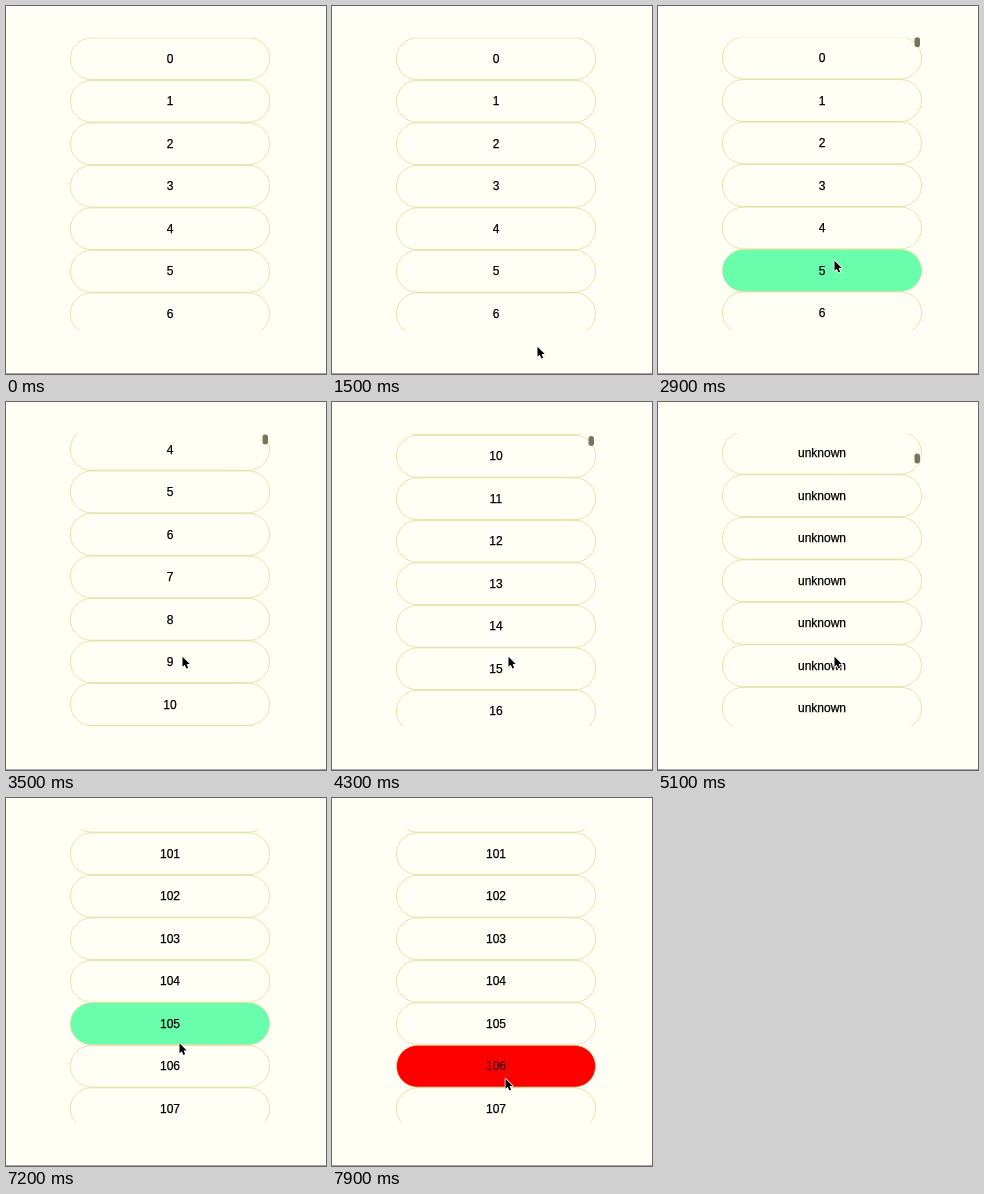
These frames come from a looping animation (320 px wide and 368 px high, 8000 ms). An HTML page with a canvas:

```html
<!DOCTYPE html>
<html lang="en">
<head>
<meta charset="utf-8">
<title>Virtual list</title>
<style>
  html, body { margin: 0; width: 100%; height: 100%; overflow: hidden; background: #fffff5; }
  canvas { display: block; width: 320px; height: 368px; }
</style>
</head>
<body>
<canvas id="stage"></canvas>
<script>
const LOOP = 8000, STEP = 100;
const LIST = { x: 64, y: 31.5, width: 200, height: 293 };
const ROW = 42.5, ROW_COUNT = 1000;
const COLORS = {
  page: '#fffff5', border: '#dede98', hover: '#69feab', pressed: '#ff0000',
  thumb: '#77735c', text: '#000000', pressedText: '#500000', edge: '#a6a6a6'
};
const POINTER_SHAPE = new Path2D('M0 0V10L2.3 7.9L3.9 11.6L5.6 10.9L4.1 7.2H7.2Z');

const canvas = document.getElementById('stage');
const ctx = canvas.getContext('2d');
const ratio = window.devicePixelRatio || 1;
canvas.width = 320 * ratio;
canvas.height = 368 * ratio;

const smooth = u => u * u * (3 - 2 * u);
const decelerate = u => 1 - (1 - u) ** 1.6055;

// Eased progress from 0 to 1 between two times
function glide(time, from, to, ease = smooth) {
  return ease(Math.min(1, Math.max(0, (time - from) / (to - from))));
}

function scrollAt(time) {
  return 423.5 * glide(time, 2865, 4300) + 3866 * glide(time, 4700, 5500, decelerate);
}

function pointerAt(time) {
  if (time < 1500) return null;
  const enter = glide(time, 1500, 2100);
  const down = glide(time, 2300, 2600);
  const up = glide(time, 5700, 6500);
  const press = glide(time, 6600, 7500);
  return {
    x: 205 - 42 * enter + 13 * down - 3 * up,
    y: 340 - 198 * enter + 112 * down - 111 * up + 137 * press
  };
}

function drawRow(top, label, fill, textColor) {
  ctx.beginPath();
  ctx.roundRect(LIST.x + 0.4, top + 0.3, LIST.width - 0.8, ROW - 0.6, ROW / 2);
  if (fill) {
    ctx.fillStyle = fill;
    ctx.fill();
  }
  ctx.strokeStyle = COLORS.border;
  ctx.lineWidth = 0.8;
  ctx.stroke();

  const x = LIST.x + LIST.width / 2, y = top + ROW / 2 + 4.2;
  ctx.fillStyle = ctx.strokeStyle = textColor;
  ctx.lineWidth = 0.25;
  ctx.fillText(label, x, y);
  ctx.strokeText(label, x, y);
}

function drawList(time, scroll, pointer) {
  const scrolling = time > 2900 && time < 5600;
  const loading = time >= 4700 && time < 5600;
  const pressed = time >= 7500;
  const hovered = pointer && !scrolling
    ? Math.floor((pointer.y - LIST.y + scroll) / ROW) : -1;

  ctx.save();
  ctx.beginPath();
  ctx.rect(LIST.x - 1, LIST.y, LIST.width + 2, LIST.height);
  ctx.clip();
  ctx.font = '12px "Liberation Sans", Arial, sans-serif';
  ctx.textAlign = 'center';
  const first = Math.floor(scroll / ROW);
  for (let i = first; i < first + 8; i++) {
    const active = i === hovered;
    const fill = active && (pressed ? COLORS.pressed : COLORS.hover);
    const textColor = active && pressed ? COLORS.pressedText : COLORS.text;
    drawRow(LIST.y + i * ROW - scroll, loading ? 'unknown' : String(i), fill, textColor);
  }
  ctx.restore();
}

function drawThumb(time, scroll) {
  if (time < 2900) return;
  const height = 10;
  const travel = (LIST.height - height) / (ROW_COUNT * ROW - LIST.height);
  ctx.globalAlpha = 1 - glide(time, 5600, 6000);
  ctx.fillStyle = COLORS.thumb;
  ctx.beginPath();
  ctx.roundRect(256.5, LIST.y - 0.3 + scroll * travel, 5.5, height, 2.75);
  ctx.fill();
  ctx.globalAlpha = 1;
}

function drawPointer({ x, y }) {
  ctx.save();
  ctx.translate(x + 0.5, y + 0.8);
  ctx.lineJoin = 'round';
  ctx.lineWidth = 1.6;
  ctx.strokeStyle = '#fff';
  ctx.stroke(POINTER_SHAPE);
  ctx.fillStyle = '#000';
  ctx.fill(POINTER_SHAPE);
  ctx.restore();
}

function draw(time) {
  const scroll = scrollAt(time);
  const pointer = pointerAt(time);
  ctx.setTransform(ratio, 0, 0, ratio, 0, 0);
  ctx.fillStyle = COLORS.page;
  ctx.fillRect(0, 0, 320, 368);
  ctx.fillStyle = COLORS.edge;
  ctx.fillRect(0, 367, 320, 1);
  drawList(time, scroll, pointer);
  drawThumb(time, scroll);
  if (pointer) drawPointer(pointer);
}

const start = performance.now();
function tick() {
  const elapsed = (performance.now() - start) % LOOP;
  draw(Math.floor(elapsed / STEP) * STEP);
  requestAnimationFrame(tick);
}
tick();
</script>
</body>
</html>
```
